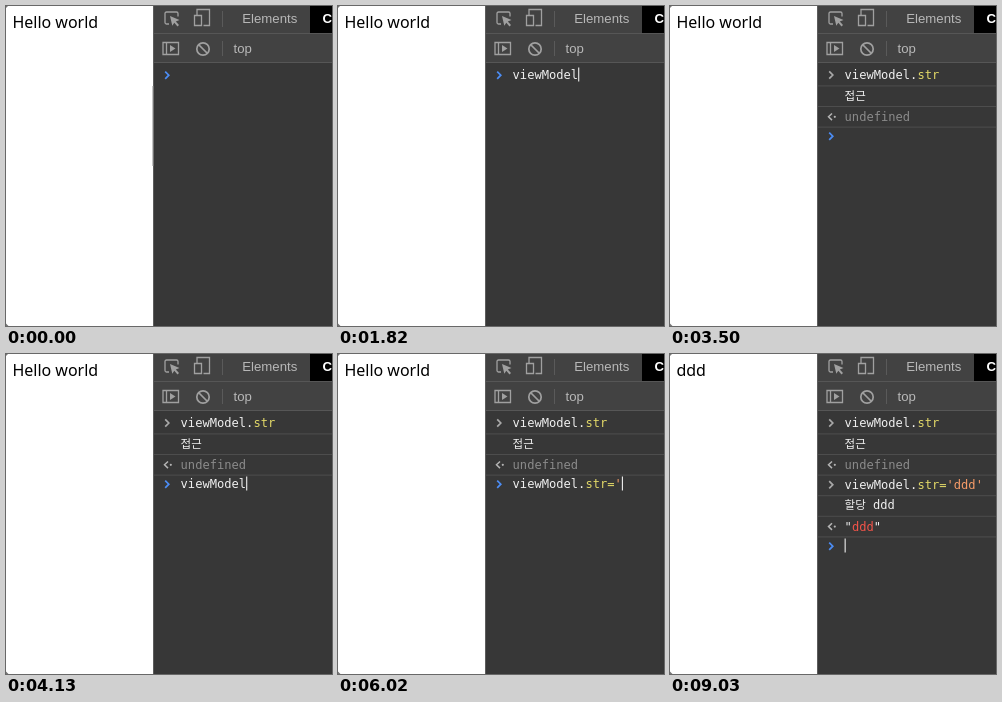
Write an HTML page that moves like this. It is 326 by 320 pixels and loops after 9100 ms.

```html
<!DOCTYPE html>
<html lang="en">
<head>
<meta charset="utf-8">
<title>Console demo</title>
<style>
  html, body { margin: 0; width: 100%; height: 100%; overflow: hidden; background: #fff; }
  svg { display: block; width: 326px; height: 320px; }
  text { white-space: pre; }
  .mono { font: 12.1px "DejaVu Sans Mono", "Noto Sans CJK KR", "Noto Sans CJK", monospace; }
  .ui { font: 13.2px "Liberation Sans", sans-serif; }
  .page { font: 16px "Noto Sans", sans-serif; }
  .log { font-size: 11.5px; }
</style>
</head>
<body>
<svg viewBox="0 0 326 320">
  <rect width="326" height="320" fill="#fff"/>
  <path d="M0 0h2L0 2zM0 320h2.5L0 317.5z" fill="#777"/>
  <text id="page" class="page" x="6.4" y="22" fill="#000"></text>

  <rect x="148" width="178" height="320" fill="#373737"/>
  <rect x="148" width="178" height="57" fill="#424242"/>
  <path d="M148 27.5h178M148 56.5h178" stroke="#565656"/>
  <path d="M147.5 0v320" stroke="#5c5c5c"/>
  <rect id="grip" x="146" y="80" width="2" height="80" fill="#8a8a8a"/>
  <path d="M216.5 5v16M216.5 35v15" stroke="#5a5a5a"/>

  <g fill="none" stroke="#a0a0a0" stroke-width="1.3">
    <path d="M163 18h-2.5q-1.5 0-1.5-1.5v-9q0-1.5 1.500-1.500h10q1.500 0 1.500 1.500v3"/>
    <path d="M164 10l9.500 4-3.700 1.500 3.200 3.500-1.500 1.400-3.200-3.600-2 3z" fill="#a0a0a0" stroke="none"/>
    <path d="M191 9V3.500h12.500v16h-6M188.500 9.500h7v10h-7z"/>
    <path d="M157 36.500h15.500v12H157zM160.500 36.500v12"/>
    <path d="M164 39l5.500 3.500-5.500 3.500z" fill="#a0a0a0" stroke="none"/>
    <path d="M192.500 38.500l9 9" stroke-width="1.7"/>
    <circle cx="197" cy="43" r="6.2" stroke-width="1.7"/>
  </g>
  <rect x="304" width="22" height="27" fill="#000"/>
  <g class="ui" fill="#b8b8b8">
    <text x="236.3" y="17">Elements</text>
    <text x="227.5" y="47">top</text>
    <text x="316.5" y="17" fill="#fff" font-weight="bold">C</text>
  </g>
  <g id="console"></g>
</svg>
<script>
const LOOP = 9100;
const CHAR = 7.284, LEFT = 174.6, TOP = 73, ROW = 20.6, ITEM = 18.35;
const WHITE = '#f0f0f0', GREY = '#8b8b8b', YELLOW = '#e2d868', ORANGE = '#f79c68', RED = '#f4544a', BLUE = '#4c8df5';
const $ = id => document.getElementById(id);

const globals = ['viewModel', 'visualViewport', 'VideoPlaybackQuality', 'VisualViewport', 'BluetoothDevice',
  'BluetoothRemoteGATTService', 'DeviceMotionEvent', 'DeviceMotionEventAcceleration',
  'DeviceMotionEventRotationRate', 'DeviceOrientationEvent', 'InputDeviceCapabilities',
  'InputDeviceInfo', 'MediaDeviceInfo'];
const members = ['str', 'constructor', 'hasOwnProperty', 'isPrototypeOf', 'propertyIsEnumerable',
  'toLocaleString', 'toString', '__defineSetter__', '__lookupSetter__'];
const past = [">str = 'Bye'", '>str', ">str = 'Bye'", '>str = 10;'];

// [time, typed text, popup open]
const typing = [
  [0, ''], [1190, 'v'], [1260, 'v', 1], [1330, 'vi', 1], [1470, 'vie', 1], [1610, 'viewModel'],
  [1890, 'viewModel.'], [1960, 'viewModel.', 1], [2310, 'viewModel.s', 1], [2520, 'viewModel.str'], [2870, ''],
  [3570, 'v'], [3640, 'v', 1], [3710, 'vi', 1], [3850, 'vie', 1], [4060, 'viewModel'],
  [4480, 'viewModel.'], [4550, 'viewModel.', 1], [4900, 'viewModel.s', 1], [5040, 'viewModel.str'],
  [5670, 'viewModel.str='], [6020, "viewModel.str='"], [6230, "viewModel.str='d"],
  [6370, "viewModel.str='dd"], [6580, "viewModel.str='ddd"], [6860, "viewModel.str='ddd'"], [7420, '']
];
const caretOff = [[0, 70], [560, 1120], [3500, 3570], [5600, 5670], [7350, 7420], [7980, 8540]];

const span = (s, fill, bold) =>
  `<tspan fill="${fill}"${bold ? ' font-weight="bold"' : ''}>${s}</tspan>`;
const text = (x, y, body, cls = '') => `<text class="mono ${cls}" x="${x}" y="${y}">${body}</text>`;

function code(s) {
  const [, obj, prop, str] = s.match(/^(\w*\.?)(\w*=?)(.*)$/);
  return span(obj, WHITE) + span(prop, YELLOW) + span(str, ORANGE);
}

// [time, marker, body, class]
const log = [
  [2870, '>', code('viewModel.str')],
  [2870, '', span('접근', WHITE), 'log'],
  [2870, '<', span('undefined', GREY)],
  [7420, '>', code("viewModel.str='ddd'")],
  [7420, '', span('할당', WHITE) + `<tspan class="mono" fill="${WHITE}"> ddd</tspan>`, 'log'],
  [7420, '<', span('"', WHITE) + span('ddd', RED) + span('"', WHITE)]
];

const chevron = (x, y, color, size = 3.6) =>
  `<path d="M${x} ${y - size}l${size} ${size}l${-size} ${size}" fill="none" stroke="${color}" stroke-width="1.7"/>`;
const outArrow = y =>
  `<path d="M162 ${y - 3.3}l-3.5 3.3l3.5 3.3" fill="none" stroke="#b4b4b4" stroke-width="1.5"/>` +
  `<circle cx="164.8" cy="${y}" r="1.1" fill="#b4b4b4"/>`;

function match(s, query, fill) {
  const i = query ? s.toLowerCase().indexOf(query) : -1;
  if (i < 0) return span(s, fill);
  const j = i + query.length;
  return span(s.slice(0, i), fill) + span(s.slice(i, j), '#fff', true) + span(s.slice(j), fill);
}

function popup(x, y, items, query) {
  let out = `<rect x="${x}" y="${y}" width="200" height="${items.length * ITEM}" fill="#2f2f2f" stroke="#555" stroke-width=".8"/>` +
    `<rect x="${x}" y="${y}" width="200" height="${ITEM}" fill="#3572aa"/>`;
  items.forEach((item, i) => {
    const old = item[0] === '>', base = y + 13.2 + i * ITEM;
    if (old) out += chevron(x + 6.2, base - 4, BLUE);
    out += text(x + (old ? 14 : 3.2), base, match(old ? item.slice(1) : item, query, i ? '#e6e6e6' : '#fff'));
  });
  return out;
}

function prompt(t, rowCount) {
  const [, typed, open] = typing.filter(k => k[0] <= t).pop();
  const dot = typed.indexOf('.') + 1, query = typed.slice(dot);
  const rowY = TOP + rowCount * ROW, y = Math.floor(rowY);
  let out = chevron(159.2, y - 3.8, BLUE), ghost = '';
  if (open) {
    const known = dot ? [...members, ...(rowCount ? ['>str'] : []), ...past] : globals;
    const items = known.filter(s => s.toLowerCase().includes(query));
    ghost = query && items[0].slice(query.length);
    if (!dot) out += outArrow(y + 15);
    out += popup(LEFT - 4 + dot * CHAR, rowY + 5.4, items, query);
  }
  out += text(LEFT, y, code(typed) + span(ghost, GREY));
  if (!caretOff.some(([a, b]) => t >= a && t < b))
    out += `<rect x="${LEFT + typed.length * CHAR}" y="${y - 11.5}" width="1.1" height="14" fill="#eee"/>`;
  return out;
}

function view(t) {
  const rows = log.filter(r => r[0] <= t);
  let out = '';
  rows.forEach(([, mark, body, cls], i) => {
    const y = TOP + i * ROW + (mark === '<' ? .6 : 0);
    out += `<path d="M148 ${TOP + i * ROW + 6.9}h178" stroke="#505050" stroke-width=".9"/>`;
    if (mark === '>') out += chevron(159.2, y - 4, '#a8a8a8');
    if (mark === '<') out += outArrow(y - 4);
    out += text(LEFT, y, body, cls);
  });
  return out + prompt(t, rows.length);
}

let last = '';
function render(t) {
  const next = view(t);
  if (next !== last) $('console').innerHTML = last = next;
  $('page').textContent = t < 7420 ? 'Hello world' : 'ddd';
  $('grip').setAttribute('opacity', t < 70 ? .5 : 0);
}

const start = performance.now();
function tick() {
  render((performance.now() - start) % LOOP);
  requestAnimationFrame(tick);
}
tick();
</script>
</body>
</html>
```
